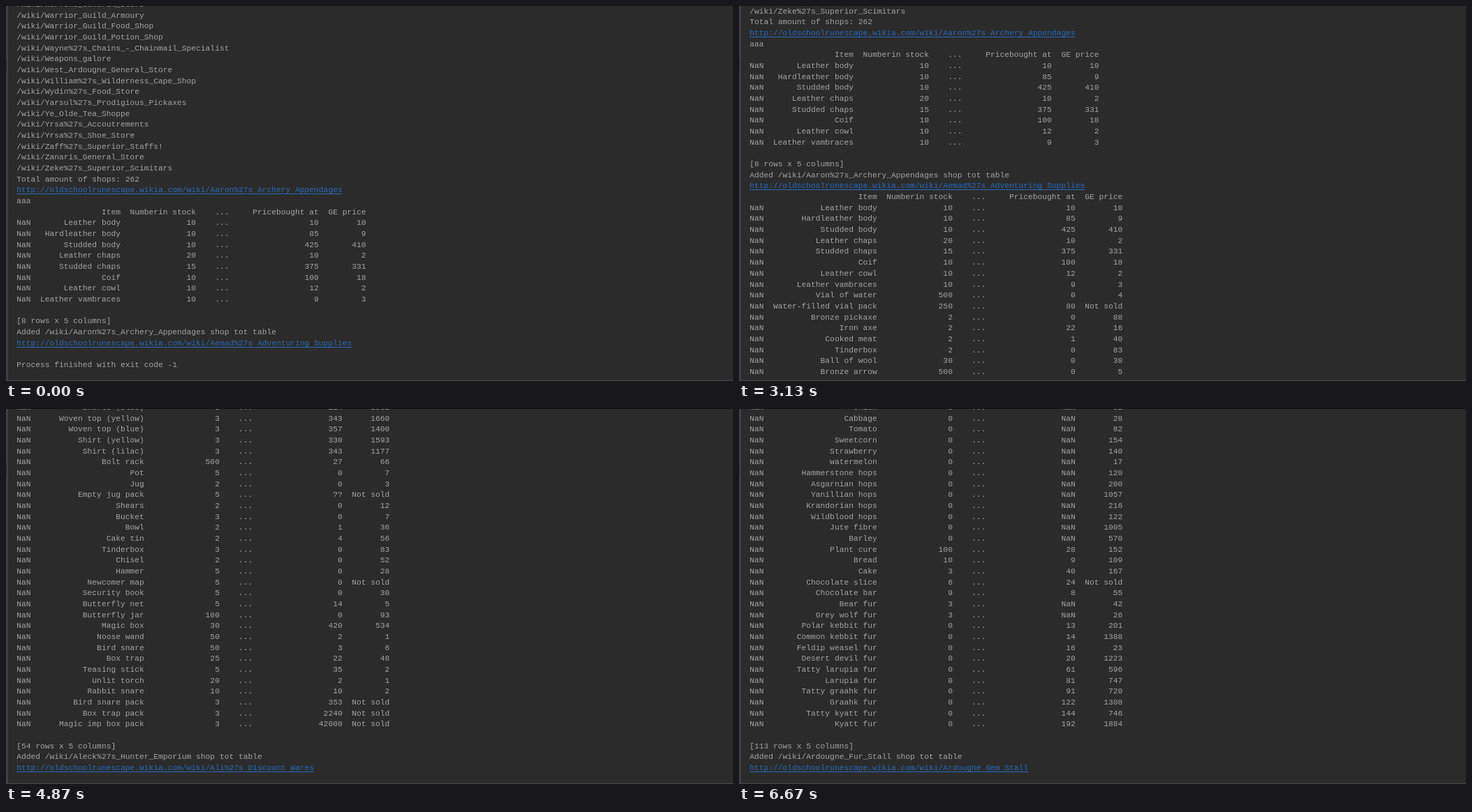
Recreate the animation shown at these times as an HTML page. Size 1041 by 538 pixels, loop 6870 ms.

```html
<!DOCTYPE html>
<html lang="en">
<head>
<meta charset="utf-8">
<title>Console run</title>
<style>
  html, body { margin: 0; width: 100%; height: 100%; overflow: hidden; background: #2b2b2b; }
  body { position: relative; }
  #view { position: absolute; inset: 0 0 1px 0; overflow: hidden; }
  #view div {
    position: absolute; left: 15.2px; white-space: pre; color: #a4a4a4;
    font: 11.27px/15.672px "Liberation Mono", "Courier New", monospace;
  }
  #view .link {
    color: #286bbd; text-decoration: underline 1px;
    text-underline-offset: 2px; text-decoration-skip-ink: none;
  }
  #gutter { position: absolute; left: 0; top: 0; width: 3px; height: 100%; background: #3e4042; }
  #gutter i { position: absolute; left: 0; top: 76px; width: 1px; height: 19px; background: #2f3133; }
  #edge { position: absolute; left: 0; bottom: 0; width: 100%; height: 1px; background: #4b4d4e; }
  #caret { position: absolute; left: 89px; top: 98px; width: 1px; height: 16px; background: #a8a8a8; }
</style>
</head>
<body>
<div id="view"></div>
<div id="caret" hidden></div>
<div id="gutter"><i></i></div>
<div id="edge"></div>
<script>
const LOOP = 6870, LINE = 15.672, REST_TOP = 508, HEIGHT = 538;
const HOME = 32.29; // line lying at the rest position while scrolled to the top

// Each shop: page name, then its goods as item,stock,price,exchange price.
const shops = [
  ["Aaron%27s_Archery_Appendages", `Leather body,10,10,10;Hardleather body,10,85,9;Studded body,10,425,410;
    Leather chaps,20,10,2;Studded chaps,15,375,331;Coif,10,100,18;Leather cowl,10,12,2;Leather vambraces,10,9,3`],
  ["Aemad%27s_Adventuring_Supplies", `Vial of water,500,0,4;Water-filled vial pack,250,80,Not sold;
    Bronze pickaxe,2,0,88;Iron axe,2,22,16;Cooked meat,2,1,40;Tinderbox,2,0,83;Ball of wool,30,0,38;
    Bronze arrow,500,0,5;Rope,20,7,86;Papyrus,50,4,166;Knife,2,2,35`],
  ["Agmundi_Quality_Clothes", `Skirt (lilac),3,302,1143;Skirt (blue),3,343,1255;Trousers (lilac),3,385,1555;
    Trousers (blue),3,412,1089;Shorts (yellow),3,198,1197;Shorts (blue),3,214,1562;Woven top (yellow),3,343,1660;
    Woven top (blue),3,357,1400;Shirt (yellow),3,330,1593;Shirt (lilac),3,343,1177`],
  ["Ak-Haranu%27s_Exotic_Shop", `Bolt rack,500,27,66`],
  ["Al_Kharid_General_Store", `Pot,5,0,7;Jug,2,0,3;Empty jug pack,5,??,Not sold;Shears,2,0,12;Bucket,3,0,7;
    Bowl,2,1,36;Cake tin,2,4,56;Tinderbox,3,0,83;Chisel,2,0,52;Hammer,5,0,28;Newcomer map,5,0,Not sold;
    Security book,5,0,30`],
  ["Aleck%27s_Hunter_Emporium", `Butterfly net,5,14,5;Butterfly jar,100,0,93;Magic box,30,420,534;
    Noose wand,50,2,1;Bird snare,50,3,6;Box trap,25,22,48;Teasing stick,5,35,2;Unlit torch,20,2,1;
    Rabbit snare,10,10,2;Bird snare pack,3,353,Not sold;Box trap pack,3,2240,Not sold;
    Magic imp box pack,3,42000,Not sold`],
  ["Ali%27s_Discount_Wares", `Pot,3,0,7;Jug,2,0,3;Empty jug pack,4,??,Not sold;Waterskin (3),10,14,Not sold;
    Desert shirt,3,22,108;Desert boots,2,11,160;Bucket,19,1,7;Fake beard,11,0,253;Kharidian headpiece,12,0,282;
    Papyrus,50,5,166;Knife,5,3,35;Tinderbox,11,0,83;Bronze pickaxe,23,0,88;Raw chicken,15,0,65`],
  ["Alice%27s_Farming_shop", `Rake,100,6,8;Seed dibber,100,6,5;Secateurs,100,5,9;Spade,100,3,62;
    Gardening trowel,100,12,7;Watering can,30,8,25;Plant pot,100,1,4;Plant pot pack,30,100,Not sold;
    Compost,100,20,21;Compost pack,30,2000,Not sold;Bucket,30,2,7;Bucket pack,15,500,Not sold;Basket,30,1,14;
    Empty sack,30,1,11;Potato,0,NaN,46;Onion,0,NaN,52;Cabbage,0,NaN,28;Tomato,0,NaN,82;Sweetcorn,0,NaN,154;
    Strawberry,0,NaN,140;watermelon,0,NaN,17;Hammerstone hops,0,NaN,120;Asgarnian hops,0,NaN,200;
    Yanillian hops,0,NaN,1057;Krandorian hops,0,NaN,216;Wildblood hops,0,NaN,122;Jute fibre,0,NaN,1005;
    Barley,0,NaN,570;Plant cure,100,28,152`],
  ["Ardougne_Baker%27s_Stall", `Bread,10,9,109;Cake,3,40,167;Chocolate slice,6,24,Not sold;Chocolate bar,9,8,55`],
  ["Ardougne_Fur_Stall", `Bear fur,3,NaN,42;Grey wolf fur,3,NaN,26;Polar kebbit fur,0,13,201;
    Common kebbit fur,0,14,1388;Feldip weasel fur,0,16,23;Desert devil fur,0,20,1223;Tatty larupia fur,0,61,596;
    Larupia fur,0,81,747;Tatty graahk fur,0,91,720;Graahk fur,0,122,1308;Tatty kyatt fur,0,144,746;
    Kyatt fur,0,192,1884`],
  ["Ardougne_Gem_Stall", ""],
];

// Only the two ends of the long shop list ever come into view.
const listHead = `Ardougne_Silver_Stall Ardougne_Spice_Stall Arhein_Store Armour_Shop Armour_Store
  Arnold%27s_Eclectic_Supplies Aubury%27s_Rune_Shop Aurel%27s_Supplies Authentic_Throwing_Weapons
  Baba_Yaga%27s_Magic_Shop Bandit_Bargains Bandit_Duty_Free Barkers%27_Haberdashery Battle_Runes
  Bedabin_Village_Bartering Betty%27s_Magic_Emporium Blades_by_Urbi Blue_Moon_Inn Bob%27s_Brilliant_Axes
  Bolkoy%27s_Village_Shop Brian%27s_Archery_Supplies Brian%27s_Battleaxe_Bazaar Burthorpe_Supplies Candle_Shop`;
const listTail = `Trader_Sven%27s_Black_Market Turael%27s_Shop Tutab%27s_Magical_Market Two_Feet_Charley%27s_Fish_Shop
  Tynan%27s_Fishing_Supplies Tyras_Supplies Uglug%27s_Stuffsies Valaine%27s_Shop_of_Champions
  Vanessa%27s_Farming_shop Varrock_General_Store Varrock_Swordshop Vermundi%27s_Clothes_Stall
  Vigr%27s_Warhammers Void_Knight_Archery_Store Void_Knight_General_Store Void_Knight_Magic_Store
  Warrens_General_Store Warrior_Guild_Armoury Warrior_Guild_Food_Shop Warrior_Guild_Potion_Shop
  Wayne%27s_Chains_-_Chainmail_Specialist Weapons_galore West_Ardougne_General_Store
  William%27s_Wilderness_Cape_Shop Wydin%27s_Food_Store Yarsul%27s_Prodigious_Pickaxes Ye_Olde_Tea_Shoppe
  Yrsa%27s_Accoutrements Yrsa%27s_Shoe_Store Zaff%27s_Superior_Staffs! Zanaris_General_Store
  Zeke%27s_Superior_Scimitars`;

const words = text => text.trim().split(/\s+/);
const parseGoods = text => text.split(";").map(item => item.trim().split(","));
// The underline stands in for the underscores of a link.
const shopUrl = i => "http://oldschoolrunescape.wikia.com/wiki/" + shops[i][0].replaceAll("_", " ");

function tableLines(goods) {
  const width = Math.max(...goods.map(g => g[0].length));
  const row = (index, [item, stock, price, exchange]) =>
    index + item.padStart(width + 2) + stock.padStart(16) + "    ..." + price.padStart(19) + exchange.padStart(10);
  return [
    row("   ", ["Item", "Numberin stock", "Pricebought at", "GE price"]),
    ...goods.map(g => row("NaN", g)),
    "", `[${goods.length} rows x 5 columns]`,
  ];
}

// The full log; rests[k] is the link that waits at the bottom before table k.
const log = [
  "D:\\Coding\\Workspaces\\Python\\python.exe D:/Coding/Workspaces/Python/RsMerchProfit/rschecker/rschecker.py",
  "[105, 282]",
  ...[...shops.map(s => s[0]), ...words(listHead), ...words(listTail)].map(name => "/wiki/" + name),
  "Total amount of shops: 262",
  shopUrl(0),
];
const rests = [log.length - 1];
let goods = [];
shops.slice(0, -1).forEach(([name, text], i) => {
  goods = goods.concat(parseGoods(text));
  if (i === 0) log.push("aaa");
  log.push(...tableLines(goods), `Added /wiki/${name} shop tot table`, shopUrl(i + 1));
  rests.push(log.length - 1);
});

// States: start time, lines printed, line lying at the rest position.
const upTo = i => log.slice(0, i + 1);
const finished = [...upTo(rests[1]), "", "Process finished with exit code -1"];
const states = [
  [0, finished, finished.length - 1],
  [530, upTo(0), HOME],
  [1930, upTo(1), HOME],
  [2330, upTo(rests[0]), HOME],
  [2400, upTo(rests[0]), rests[0]],
];

// Scroll bursts: start, end, then lines scrolled at each step before the end.
[
  [2670, 2800, 1.1, 11],
  [3130, 3200, 16.37],
  [3530, 3670, 2.7, 27],
  [3930, 4070, 2.71, 28],
  [4400, 4470, 38.13],
  [4730, 4870, 4.6, 47.5],
  [5200, 5330, 5.7, 58.5],
  [5730, 5800, 79],
  [6130, 6270, 8.3, 85],
  [6600, 6670, 92],
].forEach(([start, end, ...scrolled], k) => {
  const lines = upTo(rests[k + 1]);
  scrolled.forEach((n, i) => states.push([start + 70 * i, lines, rests[k] + n]));
  states.push([end, lines, rests[k + 1]]);
});

const view = document.getElementById("view");
const caret = document.getElementById("caret");

function show([, lines, anchor]) {
  const rows = [];
  lines.forEach((text, i) => {
    const top = REST_TOP + (i - anchor) * LINE;
    if (!text || top < -LINE || top > HEIGHT) return;
    const row = document.createElement("div");
    row.textContent = text;
    row.style.top = top.toFixed(2) + "px";
    if (text.startsWith("http")) row.className = "link";
    rows.push(row);
  });
  view.replaceChildren(...rows);
}

const begin = performance.now();
let current;
function tick() {
  const time = (performance.now() - begin) % LOOP;
  const state = states.findLast(s => s[0] <= time);
  if (state !== current) show(current = state);
  caret.hidden = time < 330 || time >= 530;
  requestAnimationFrame(tick);
}
tick();
</script>
</body>
</html>
```
